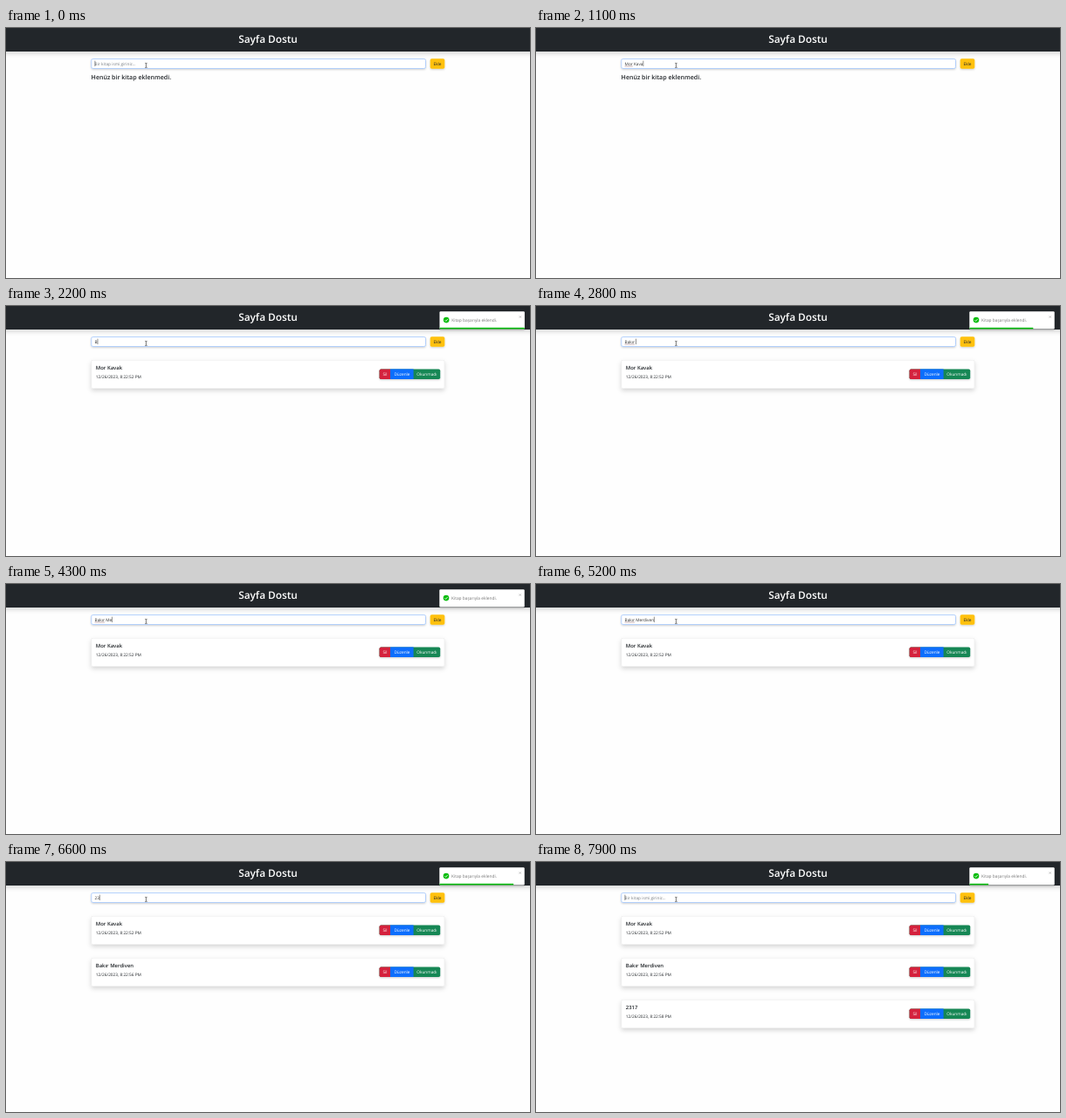
Animation, 600 px wide and 287 px high, one loop 8000 ms. Source, as an HTML page:

```html
<!DOCTYPE html>
<html lang="tr">
<head>
<meta charset="utf-8">
<title>Sayfa Dostu</title>
<style>
  html, body { margin: 0; width: 100%; height: 100%; overflow: hidden; background: #fefefe; }
  svg { display: block; width: 600px; height: 287px; }
  text { font-family: "Open Sans", "Noto Sans", sans-serif; font-size: 4.75px; fill: #212529;
         white-space: pre; text-rendering: geometricPrecision; }
  .semi { font-weight: 600; }
  .mid { text-anchor: middle; }
  .light { fill: #fff; }
</style>
</head>
<body>
<svg viewBox="0 0 600 287">
  <defs>
    <filter id="shadow" x="-10%" y="-40%" width="120%" height="200%">
      <feDropShadow dx="0" dy="2.4" stdDeviation="2.4" flood-opacity=".16"/>
    </filter>
    <filter id="soft" x="-30%" y="-40%" width="160%" height="200%">
      <feDropShadow dx="0" dy="1" stdDeviation="1.3" flood-opacity=".2"/>
    </filter>
  </defs>
  <rect width="600" height="287" fill="#fefefe"/>
  <rect x="-30" y="-10" width="660" height="37" fill="#212529" filter="url(#shadow)"/>
  <text class="mid semi light" x="300" y="17.4" style="font-size:11.8px">Sayfa Dostu</text>

  <rect x="97.8" y="35.5" width="382.7" height="11" rx="1.8" fill="#fff" stroke="#86b7fe" stroke-width=".6" filter="url(#soft)"/>
  <text id="hint" x="101.6" y="42.6" style="fill:#777d83">Bir kitap ismi giriniz...</text>
  <text id="typed" x="101.6" y="42.6" style="fill:#333"></text>
  <path id="spell" stroke="#96666a" stroke-width=".5"/>
  <path id="caret" stroke="#222" stroke-width=".5"/>
  <path d="M159.2 40.3h.8l.4.3.4-.3h.8M160.4 40.6v4.6M159.2 45.5h.8l.4-.3.4.3h.8" fill="none" stroke="#222" stroke-width=".6"/>

  <rect x="485.7" y="35.3" width="16.6" height="11.4" rx="1.8" fill="#ffc107" filter="url(#soft)"/>
  <text class="mid" x="494" y="42.6">Ekle</text>
  <text id="empty" class="semi" x="97.6" y="59.2" style="font-size:7.05px">Henüz bir kitap eklenmedi.</text>
  <g id="list"></g>

  <g id="toast">
    <rect x="496.3" y="6.2" width="97.4" height="20.2" rx="1.2" fill="#fff" filter="url(#soft)"/>
    <circle cx="504" cy="16.1" r="3.3" fill="#07bc0c"/>
    <path d="M502.4 16.2l1.2 1.2 2.2-2.6" fill="none" stroke="#fff" stroke-width=".8"/>
    <text x="510" y="17.8" style="font-size:4.85px;fill:#757575">Kitap başarıyla eklendi.</text>
    <path d="M587.6 11.4l2.2 2.2m0-2.2l-2.2 2.2" stroke="#888" stroke-width=".5"/>
    <rect id="bar" x="496.5" y="24.8" height="1.6" fill="#07bc0c"/>
  </g>
</svg>
<script>
const LOOP = 8000, STEP = 100, SCALE = 0.306;
const $ = id => document.getElementById(id);

// keys: time of each keystroke; blink: start of the caret cycle after saving
const books = [
  { name: "Mor Kavak", keys: [200, 300, 500, 600, 700, 800, 900, 1100, 1300],
    save: 1600, blink: 1200, stamp: "8:22:52" },
  { name: "Bakır Merdiven", keys: [2200, 2300, 2400, 2500, 2600, 2700, 3500, 4200, 4600, 4700, 4900, 5000, 5100, 5200],
    save: 5700, blink: 5700, stamp: "8:22:56" },
  { name: "2317", keys: [6400, 6600, 6800, 7000], save: 7700, blink: 7700, stamp: "8:22:58" }
];
const toasts = [1647, 5690];

function card(book, i) {
  const buttons = [["Sil", 434], ["Düzenle", 453.4], ["Okunmadı", 481.8]]
    .map(([label, x]) => `<text class="mid light" x="${x}" y="79.9">${label}</text>`).join("");
  return `<g transform="translate(0 ${i * 48})">
    <rect x="97.7" y="62.2" width="404.4" height="32.5" rx="1.8" fill="#fff" stroke="#dcdcdc" stroke-width=".4" filter="url(#shadow)"/>
    <text class="semi" x="102.8" y="73.3" style="font-size:5.9px">${book.name}</text>
    <text x="102.8" y="82.6">12/26/2023, ${book.stamp} PM</text>
    <rect x="427.6" y="72.4" width="69.6" height="11.6" rx="1.8" fill="#198754" filter="url(#soft)"/>
    <path d="M440 72.4h-10.6a1.8 1.8 0 0 0-1.8 1.8v8a1.8 1.8 0 0 0 1.8 1.8h10.6z" fill="#d4213d"/>
    <rect x="440" y="72.4" width="26.6" height="11.6" fill="#0d6efd"/>${buttons}</g>`;
}
$("list").innerHTML = books.map(card).join("");
const cards = [...$("list").children];

function bezier(x1, y1, x2, y2) {
  const at = (a, b, s) => 3 * (1 - s) * (1 - s) * s * a + 3 * (1 - s) * s * s * b + s * s * s;
  return x => {
    let lo = 0, hi = 1;
    for (let i = 0; i < 24; i++) {
      const s = (lo + hi) / 2;
      if (at(x1, x2, s) < x) lo = s; else hi = s;
    }
    return at(y1, y2, lo);
  };
}
const bounce = bezier(0.215, 0.61, 0.355, 1), ease = bezier(0.25, 0.1, 0.25, 1);

function follow(stops, p, curve) {
  for (let i = 1; i < stops.length; i++) {
    const [a, from] = stops[i - 1], [b, to] = stops[i];
    if (p <= b) return from + (to - from) * curve((p - a) / (b - a));
  }
  return stops[stops.length - 1][1];
}
const enter = [[0, 3000], [0.6, -25], [0.75, 10], [0.9, -5], [1, 0]];
const leave = [[0, 0], [0.2, -20], [1, 2000]];
const MOVE = 700, WAIT = 655, LIFE = 2000, STAY = 2700;

const show = (el, on) => el.setAttribute("visibility", on ? "visible" : "hidden");

function drawToast(t) {
  const age = t - (toasts.filter(s => s <= t).pop() ?? -LOOP);
  show($("toast"), age < STAY + MOVE);
  if (age >= STAY + MOVE) return;
  const out = age > STAY;
  const x = out ? follow(leave, (age - STAY) / MOVE, ease) : follow(enter, age / MOVE, bounce);
  const fade = out ? 1 - Math.max(0, x) / 2000 : 1 - Math.max(0, x) / 3000;
  $("toast").setAttribute("transform", `translate(${x * SCALE} 0)`);
  $("toast").setAttribute("opacity", fade);
  const left = 1 - Math.min(1, Math.max(0, (age - WAIT) / LIFE));
  $("bar").setAttribute("width", 97 * left);
}

function drawInput(t) {
  const book = books.find(b => t < b.save);
  const saved = books.filter(b => b.save <= t).pop();
  const count = book ? book.keys.filter(k => k <= t).length : 0;
  const typed = $("typed");
  typed.textContent = count ? book.name.slice(0, count) : "";
  show($("hint"), !count);

  const base = count ? book.keys[count - 1] : saved ? saved.blink : 0;
  const x = 101.9 + (count ? typed.getComputedTextLength() : 0);
  $("caret").setAttribute("d", `M${x} 37.6V44`);
  show($("caret"), (t - base) % 1000 < 500);

  const gap = count ? book.name.indexOf(" ") : -1;
  const marked = gap > 0 && count > gap && t >= book.keys[gap] + 100;
  show($("spell"), marked);
  if (marked) $("spell").setAttribute("d", `M101.6 44h${typed.getSubStringLength(0, gap)}`);
}

function draw(ms) {
  const t = Math.floor(ms % LOOP / STEP) * STEP;
  drawInput(t);
  drawToast(t);
  show($("empty"), t < books[0].save);
  cards.forEach((c, i) => show(c, t >= books[i].save));
}

let start;
function tick(now) {
  start ??= now;
  draw(now - start);
  requestAnimationFrame(tick);
}
draw(0);
requestAnimationFrame(tick);
</script>
</body>
</html>
```
